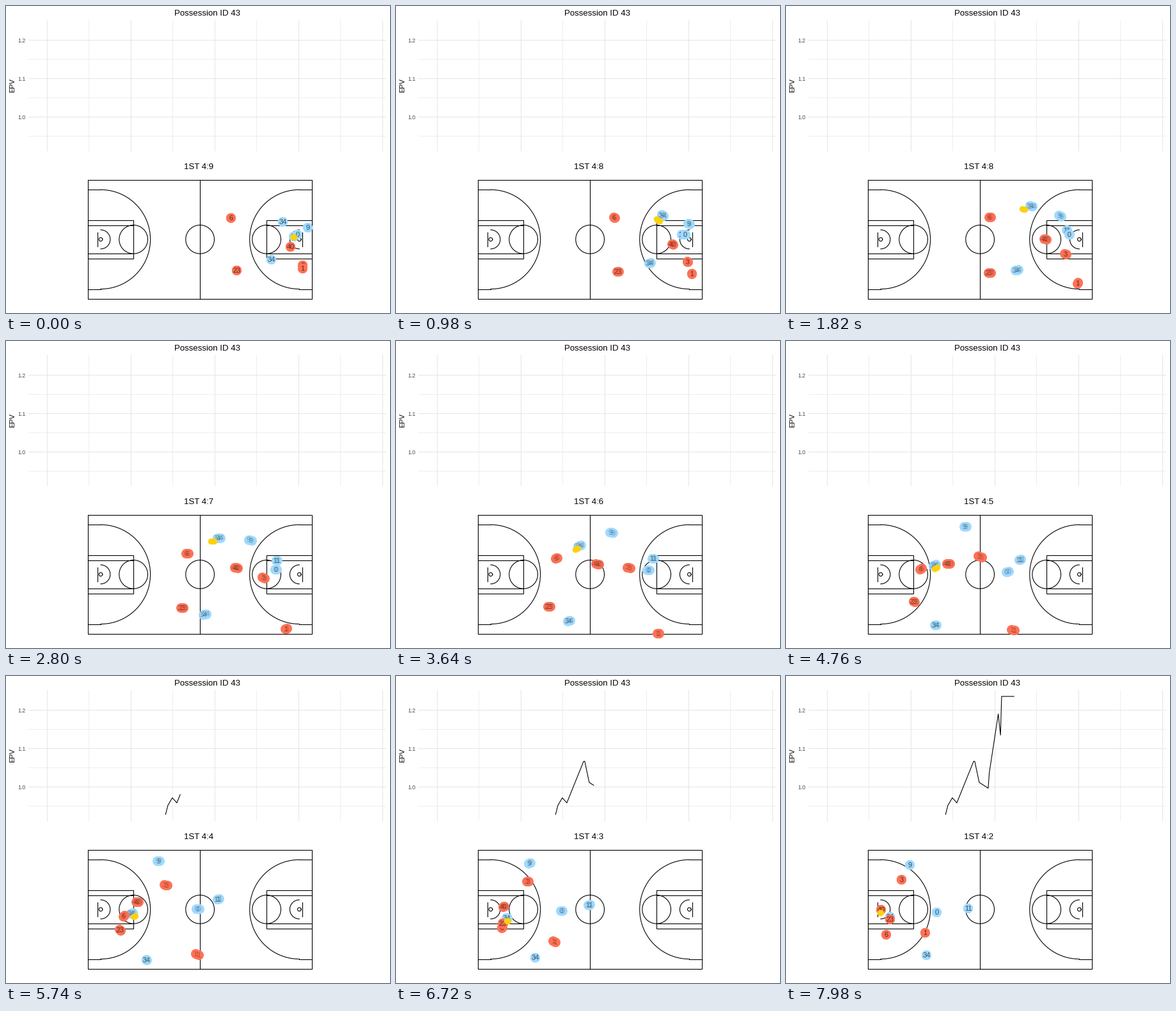
Animation, 600 px wide and 480 px high, one loop 8 s. Source, as a matplotlib script:

```python
import numpy as np
import matplotlib.pyplot as plt
from matplotlib.animation import FuncAnimation

plt.rcParams["font.family"] = "Liberation Sans"

W, H = 600, 480
PX = 0.72                      # points per pixel at 100 dpi
LOOP, TICK, STEP = 8000, 40, 140
LAST = LOOP // STEP            # number of the last step
BLUE, RED, GOLD = "#9fdaff", "#ff7256", "#ffd10a"

fig = plt.figure(figsize=(W / 100, H / 100), dpi=100, facecolor="white")
ax = fig.add_axes([0, 0, 1, 1])
SHIFT = 0.6                    # aligns the drawing with the pixel grid
ax.set_xlim(SHIFT, W + SHIFT)
ax.set_ylim(H + SHIFT, SHIFT)
ax.axis("off")


def line(x, y, color="black", width=1.1, **kw):
    return ax.plot(x, y, color=color, lw=width * PX, **kw)[0]


def label(x, y, text, size, color="black", ha="center", **kw):
    """Text whose capitals are centred on y."""
    return ax.text(x, y + 0.36 * size, text, fontsize=size * PX, color=color,
                   ha=ha, va="baseline", **kw)


def arc(x, y, r, a=0, b=360):
    t = np.radians(np.linspace(a, b, 90))
    line(x + r * np.cos(t), y + r * np.sin(t))


def box(x0, y0, x1, y1):
    line([x0, x1, x1, x0, x0], [y0, y0, y1, y1, y0], solid_joinstyle="miter")


def ease(u):
    u = np.clip(u, 0, 1)
    return u * u * (3 - 2 * u)


# Chart panel
LEFT, RIGHT, TOP, BOTTOM = 36, 594, 23, 227
for major in (False, True):
    style = dict(color="#e6e6e6" if major else "#e4e4e4",
                 width=1.07 if major else 0.6, zorder=1)
    for i in range(not major, 9, 2):
        line([64.5 + 65.5 * i] * 2, [TOP, BOTTOM], **style)
    for i in range(not major, 6, 2):
        line([LEFT, RIGHT], [53.5 + 30.1 * i] * 2, **style)
for i, tick in enumerate(("1.2", "1.1", "1.0")):
    label(31, 54 + 60.2 * i, tick, 8.8, "#4d4d4d", "right")
label(315, 10.8, "Possession ID 43", 13.2)
ax.text(14, 125, "EPV", fontsize=11 * PX, rotation=90, ha="center",
        va="baseline", rotation_mode="anchor")

# Court, measured in feet from its left end
FT = 350 / 94
X0, X1, Y0, Y1 = 129, 478.5, 272.5, 458.5
MID_X, MID_Y = (X0 + X1) / 2, (Y0 + Y1) / 2
box(X0, Y0, X1, Y1)
line([MID_X] * 2, [Y0, Y1])
arc(MID_X, MID_Y, 6 * FT)
for end, way in ((X0, 1), (X1, -1)):
    hoop, foul, board = (end + way * d * FT for d in (5.25, 19, 4))
    turn = 0 if way > 0 else 180
    box(end, MID_Y - 8 * FT, foul, MID_Y + 8 * FT)
    for side in (-1, 1):
        line([end, foul], [MID_Y + side * 6 * FT] * 2)
        line([end, hoop], [MID_Y + side * 20.85 * FT] * 2)
    line([board] * 2, [MID_Y - 3 * FT, MID_Y + 3 * FT])
    arc(foul, MID_Y, 6 * FT)
    arc(hoop, MID_Y, 0.75 * FT)
    arc(hoop, MID_Y, 4 * FT, turn - 90, turn + 90)
    arc(hoop, MID_Y, 20.85 * FT, turn - 90, turn + 90)


def run(*points):
    """Curve through evenly spaced points, speeding up and slowing down."""
    points = np.array(points, float)
    n = len(points)
    curve = np.polyfit(np.linspace(0, 1, n), points, n - 1)
    return lambda t: ease(t / LAST) ** np.arange(n)[::-1] @ curve


carrier = run((433, 338), (317, 311), (227, 354), (163, 377))


def ball(t):
    """Picked up, dribbled beside the carrier, then laid up."""
    sway = np.array([-4 - 8 * np.cos(2 * np.pi * (t - 13) / 54), 5])
    pickup = np.array([21.5, 19]) * (1 - ease(t / 9))
    layup = np.array([-8, -11]) * ease((t - 48) / 9)
    return carrier(t) + sway + pickup + layup


cast = [
    ("34", BLUE, carrier),
    ("34", BLUE, run((415, 397), (257, 441), (220, 437))),
    ("9", BLUE, run((472, 347), (319, 296), (194, 296))),
    ("11", BLUE, run((450, 361), (392, 340), (285, 364))),
    ("0", BLUE, run((456, 358), (381, 359), (236, 370))),
    ("6", RED, run((352, 332), (238, 344), (157, 405))),
    ("40", RED, run((445, 377), (296, 348), (149, 366))),
    ("3", RED, run((464, 406), (346, 349), (181, 319))),
    ("1", RED, run((464, 411), (395, 458), (218, 402))),
    ("23", RED, run((361, 414), (226, 414), (163, 381))),
    ("", GOLD, ball),
]

# Three moments of play share each step
OFFSETS = (-1 / 3, 0, 1 / 3)
dots, numbers = [], []
for n, (name, color, _) in enumerate(cast):
    size = 15 if name else 9.5
    dots.append(ax.plot([], [], "o", color=color, ms=size * PX, mew=0,
                        snap=False, zorder=5 + 2 * n)[0])
    numbers.append([label(0, 0, name, 11, alpha=0.26, zorder=6 + 2 * n)
                    for _ in OFFSETS] if name else [])

# Expected value: one reading per moment between its turning points
turns = [(0, 217), (2, 203), (6, 191), (10, 199), (25, 134), (26, 134),
         (30, 167), (38, 176), (39, 152), (47, 60), (49, 93), (50, 32.5)]
moments = np.arange(62)
epv_x = 250 + 1.75 * moments
epv_y = np.interp(moments, *zip(*turns))
curve = line([], [], zorder=4)
clock = label(301.5, 251, "", 13.2)


def draw(i):
    k = (i * TICK + TICK // 2) // STEP
    for dot, texts, (_, _, path) in zip(dots, numbers, cast):
        spots = [path(k + d) for d in OFFSETS]
        dot.set_data(*zip(*spots))
        for text, (x, y) in zip(texts, spots):
            text.set_position((x, y + 0.36 * 11))
    shown = max(0, 3 * (k - 41) + 14)
    curve.set_data(epv_x[:shown], epv_y[:shown])
    clock.set_text(f"1ST 4:{int(9.66 - 0.12 * k)}")
    return [*dots, curve, clock]


anim = FuncAnimation(fig, draw, frames=LOOP // TICK, interval=TICK,
                     init_func=lambda: draw(0), repeat=True, repeat_delay=0,
                     blit=False)
plt.show()
```
